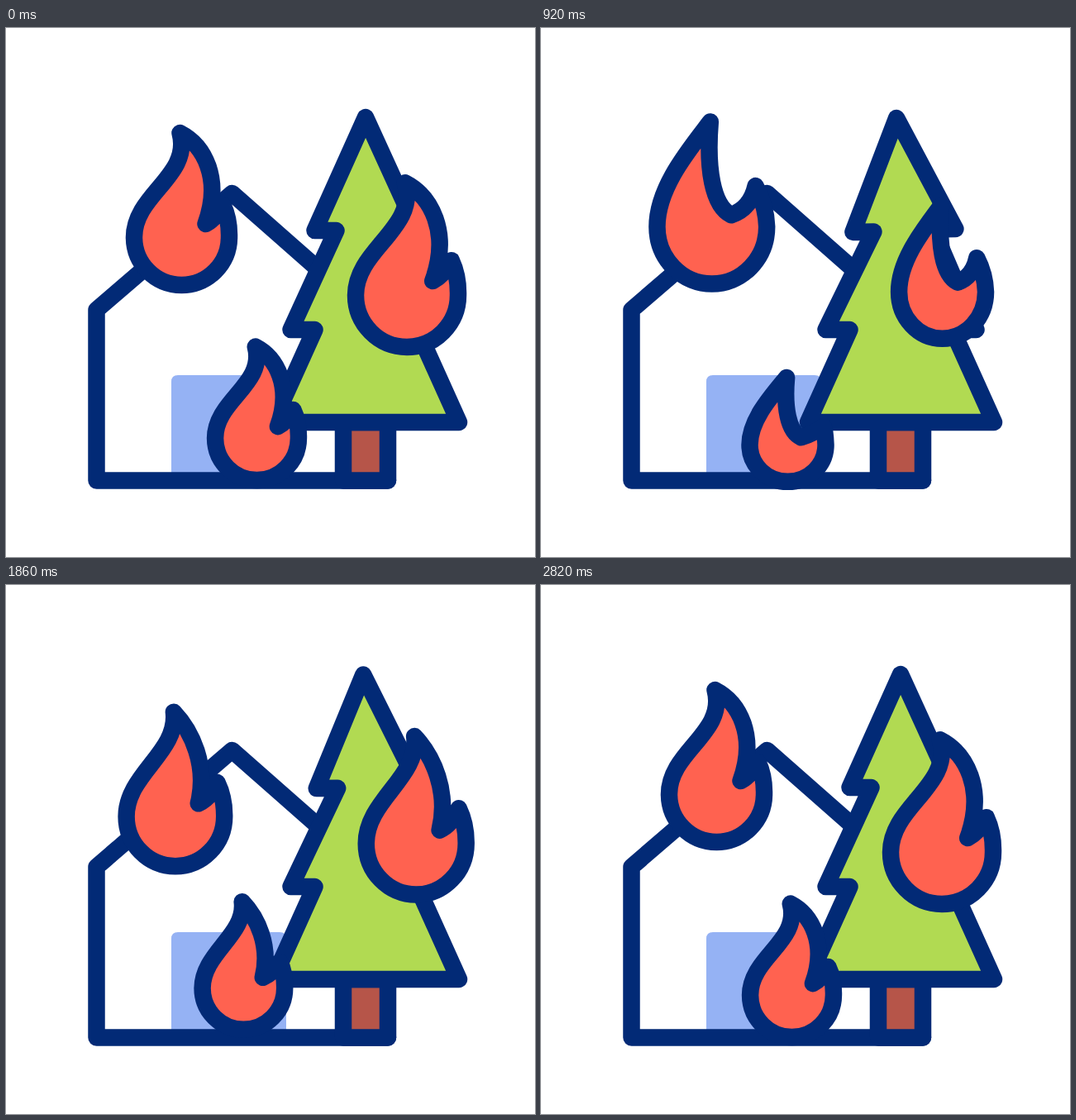
Recreate the animation shown at these times as an HTML page. Size 640x640 px, loop 3.02 s.

```html
<!DOCTYPE html>
<html lang="en">
<head>
<meta charset="utf-8">
<title>House and tree on fire</title>
<style>
  html, body { margin: 0; height: 100%; overflow: hidden; background: #fff; }
  svg { display: block; width: 100vw; height: 100vh; }
  .line { stroke: #022a76; stroke-width: 20.5; stroke-linecap: round; stroke-linejoin: round; fill: none; }
  .flame { fill: #ff6250; }
</style>
</head>
<body>
<svg viewBox="0 0 640 640">
  <path fill="#95b2f4" d="M200 547V428q0-8 8-8H331q8 0 8 8V547z"/>
  <path class="line" d="M378 292L273.5 200L109.500 341V547.500H462"/>
  <path class="line" style="fill:#b65549" d="M408 477V547.500H462V477z"/>
  <path class="line" id="tree" style="fill:#b1da52"/>
  <path class="line flame"/>
  <path class="line flame"/>
  <path class="line flame"/>
</svg>
<script>
const LOOP = 3020, START = 200, MOVE = 2620;
const SWAY = MOVE / 2, DRIFT = MOVE / 4, FLICKER = MOVE / 6;

// Key points around the round base: tip, left curve, widest point, shoulder, hook, crook, notch, right curve
const curled = [
  [-2, -184], [12, -132], [-57.5, -110], [-57.5, -58],
  [58, -80], [50, -97], [41, -80], [29, -74], [49, -129], [27, -169]];
const horned = hook => [
  [-2, -197], [-31, -164], [-67, -117], [-67, -70],
  [66, -97], hook, [47, -92], [23, -84], [-3, -92], [-9, -138]];

// Poses are base x, base y, scale x, scale y; drifts weigh the waves below
const flames = [
  { curl: [212.5, 311, 1, 1], horn: [212, 311, 1, 1], hook: [53, -120],
    driftX: [-6.5, -4.5, -.7], driftY: [-12, 13.2, 4.5] },
  { curl: [485, 386, 1.078, 1.08], horn: [488.5, 385, .77, .8], hook: [53, -121],
    driftX: [-7, 4.5, .8], driftY: [-12, -7, -1] },
  { curl: [303.5, 547, .877, .877], horn: [305.5, 547, .68, .625], hook: [63, -105],
    driftX: [-6.5, -9, -1.8], driftY: [5.5, -4, -1] }];

// Right half of the tree: distance from the axis, height, sway
const AXIS = 435.5;
const corners = [[62, 245, 4], [36, 245, 3], [91, 365, 0], [62, 365, 0], [112.5, 477, 0]];

const tree = document.getElementById('tree');
const flamePaths = document.querySelectorAll('.flame');
const mixLists = (a, b, k) => a.map((v, i) => v + (b[i] - v) * k);
const ease = u => u < .5 ? 8 * u ** 4 : 1 - 8 * (1 - u) ** 4;

function drift([swing, lift, twist], angle) {
  return swing * Math.sin(angle) + lift * (1 - Math.cos(angle)) + twist * (1 - Math.cos(2 * angle));
}

function flameShape(flame, morph, angle) {
  const [x, y, sx, sy] = mixLists(flame.curl, flame.horn, morph);
  const baseX = x + drift(flame.driftX, angle), baseY = y + drift(flame.driftY, angle);
  const horn = horned(flame.hook);
  const [tip, left1, left2, side, shoulder, hook, crook, notch, right1, right2] =
    curled.map((point, i) => {
      const [px, py] = mixLists(point, horn[i], morph);
      return [baseX + px * sx, baseY + py * sy];
    });
  const radius = [baseX - side[0], baseY - side[1]];
  return `M${tip}C${left1} ${left2} ${side}A${radius} 0 0 0 ${baseX + radius[0]} ${side[1]}` +
    `Q${shoulder} ${hook}Q${crook} ${notch}C${right1} ${right2} ${tip}Z`;
}

function treeShape(sway) {
  const half = side => corners.map(([x, y, bend]) =>
    [AXIS + side * x + bend * sway, y - side * bend * sway / 2]);
  return 'M' + [[AXIS - .5 - 5 * sway, 108 + sway], ...half(1), ...half(-1).reverse()].join('L') + 'Z';
}

function draw(now) {
  const t = Math.min(Math.max(now % LOOP - START, 0), MOVE);
  const turn = period => 2 * Math.PI * t / period;
  const morph = ease(1 - Math.abs(2 * (t / FLICKER % 1) - 1));
  tree.setAttribute('d', treeShape((1 - Math.cos(turn(SWAY))) / 2));
  flames.forEach((flame, i) =>
    flamePaths[i].setAttribute('d', flameShape(flame, morph, turn(DRIFT))));
}

const begin = performance.now();
function tick() {
  draw(performance.now() - begin);
  requestAnimationFrame(tick);
}
tick();
</script>
</body>
</html>
```
